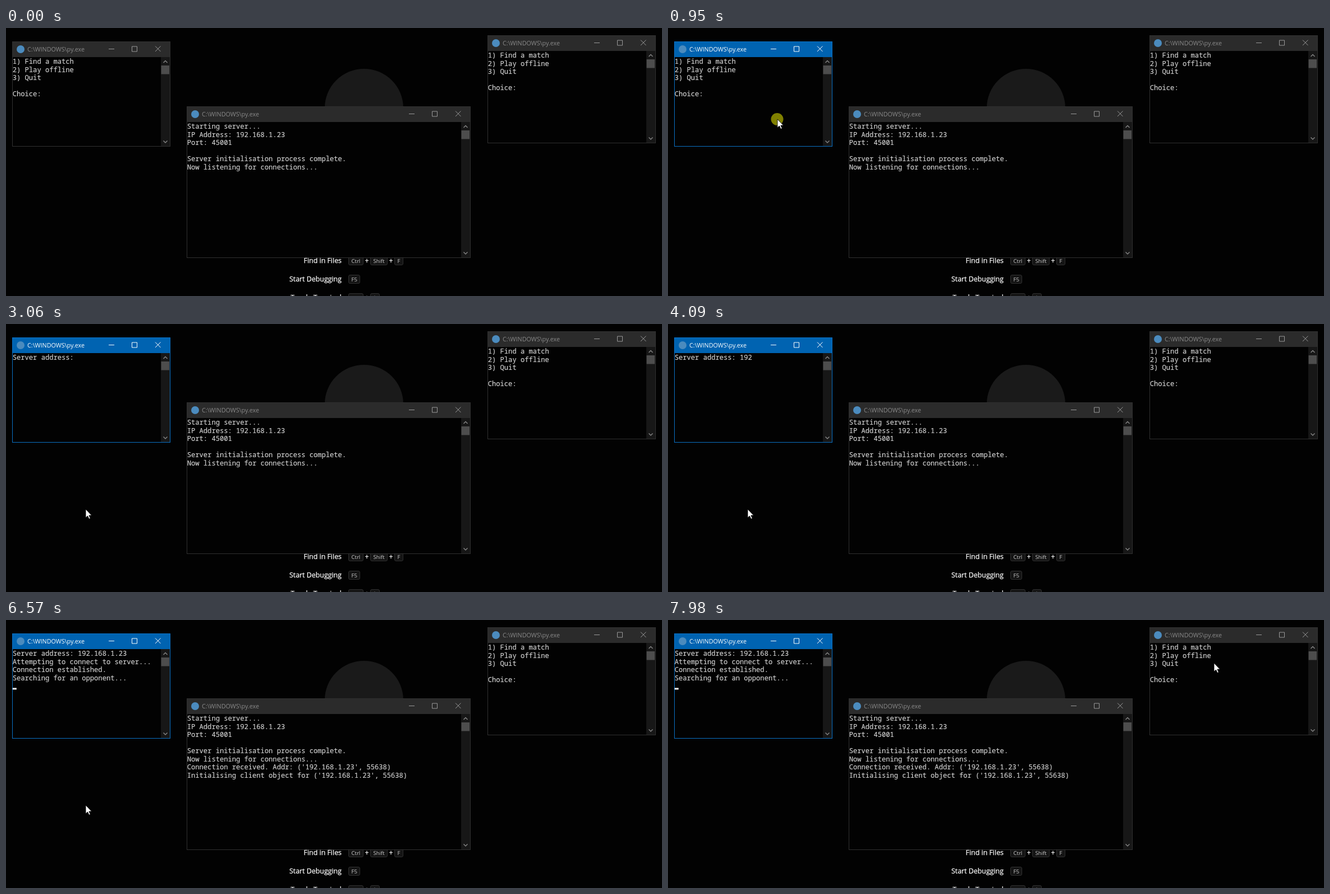
An HTML page for the animation above (8000 ms loop, 1169 px wide and 479 px high).

```html
<!DOCTYPE html>
<html lang="en">
<head>
<meta charset="utf-8">
<title>Game server and two clients</title>
<style>
  html, body { margin: 0; width: 100%; height: 100%; overflow: hidden; background: #020202; }
  svg { display: block; }
  text { white-space: pre; }
  .mono { font: 12.12px "Noto Sans Mono", monospace; fill: #d4d4d4; stroke: #d4d4d4; stroke-width: .15; }
  .title { font: 10.75px "Open Sans", sans-serif; fill: #8a8a8a; }
  .label { font: 12.4px "Open Sans", sans-serif; fill: #fff; stroke: #fff; stroke-width: .25; }
  .key { font: 9.6px "Open Sans", sans-serif; fill: #ccc; }
  .bar { fill: #2b2b2b; }
  .edge { fill: none; stroke: #303030; }
  .icons { fill: none; stroke: #999; }
  .active .bar { fill: #0063b1; }
  .active .edge { stroke: #0a70c4; }
  .active .title { fill: #fff; }
  .active .icons { stroke: #fff; }
</style>
</head>
<body>
<svg id="stage" width="1169" height="479" viewBox="0 0 1169 479"></svg>
<script>
const LOOP = 8000, TICK = 24, CELL_W = 7.27, CELL_H = 14.55;
const stage = document.getElementById('stage');
const clamp = (v, lo, hi) => Math.max(lo, Math.min(hi, v));

function add(parent, tag, attrs = {}, content) {
  const el = document.createElementNS('http://www.w3.org/2000/svg', tag);
  for (const name in attrs) el.setAttribute(name, attrs[name]);
  if (content !== undefined) el.textContent = content;
  parent.append(el);
  return el;
}

function setVisible(el, on) {
  el.setAttribute('visibility', on ? 'visible' : 'hidden');
}

function makeWindow(x, y, w, h) {
  const g = add(stage, 'g', { transform: `translate(${x} ${y})` });
  const bar = w - 17, mid = w - 9;
  add(g, 'rect', { width: w, height: h, fill: '#020202' });
  add(g, 'rect', { class: 'bar', width: w, height: 28 });
  add(g, 'rect', { x: bar, y: 28, width: 16, height: h - 29, fill: '#171717' });
  add(g, 'rect', { x: bar + .5, y: 43, width: 14.5, height: 15.5, fill: '#4d4d4d' });
  add(g, 'path', {
    d: `M${mid - 3.5} 38l3.5 -3.5l3.5 3.5M${mid - 3.5} ${h - 10.5}l3.5 3.5l3.5 -3.5`,
    fill: 'none', stroke: '#858585', 'stroke-width': 1.4
  });
  add(g, 'rect', { class: 'edge', x: .5, y: .5, width: w - 1, height: h - 1 });
  add(g, 'circle', { cx: 15, cy: 14, r: 7, fill: '#4b8bbe' });
  add(g, 'text', { class: 'title', x: 27, y: 18 }, 'C:\\WINDOWS\\py.exe');
  add(g, 'path', {
    class: 'icons',
    d: `M${w - 110} 13.5h10M${w - 68.5} 9h9v9h-9zM${w - 27} 8.5l9.5 9.5m0 -9.5l-9.5 9.5`
  });
  const rows = Array.from({ length: 8 }, (_, i) =>
    add(g, 'text', { class: 'mono', x: .8, y: 40 + i * CELL_H }, ''));
  return {
    g,
    show(lines) {
      rows.forEach((row, i) => {
        const line = lines[i] || '';
        if (row.textContent !== line) row.textContent = line;
      });
    }
  };
}

function makeShortcut(y, name, keys) {
  const label = (x, s, anchor) => add(stage, 'text', { class: 'label', x, y, 'text-anchor': anchor }, s);
  label(598, name, 'end');
  let x = 610;
  keys.forEach((key, i) => {
    if (i) label(x - 6, '+', 'middle');
    const box = add(stage, 'rect', { x: x + .5, y: y - 11.5, height: 15, rx: 2.5, fill: '#141414', stroke: '#303030' });
    const text = add(stage, 'text', { class: 'key', x: x + 5.5, y: y - .5 }, key);
    const w = Math.round(text.getComputedTextLength() + 11);
    box.setAttribute('width', w - 1);
    x += w + 12;
  });
}

// Editor behind the windows
add(stage, 'circle', { cx: 638, cy: 143, r: 70, fill: '#1a1a1a' });
makeShortcut(420, 'Find in Files', ['Ctrl', 'Shift', 'F']);
makeShortcut(453, 'Start Debugging', ['F5']);
makeShortcut(486, 'Toggle Terminal', ['Ctrl', '`']);

const left = makeWindow(11, 24, 282, 188);
const right = makeWindow(858, 13, 300, 193);
const server = makeWindow(322, 140, 506, 271);
const caret = add(left.g, 'rect', { width: 7, height: 3, fill: '#f2f2f2' });
const halo = add(stage, 'circle', { cx: 194.5, cy: 163, r: 11, fill: '#808000' });
const mouse = add(stage, 'path', {
  d: 'M0 0V15.2L3.5 12L6 17.4L8.3 16.4L5.9 11.1H10.6Z',
  fill: '#fff', stroke: '#000', 'stroke-width': .8
});

const menu = ['1) Find a match', '2) Play offline', '3) Quit', '', 'Choice: '];
const chosen = [...menu.slice(0, 4), 'Choice: 1'];
const prompt = 'Server address: ', address = '192.168.1.23';
const listening = ['Starting server...', 'IP Address: 192.168.1.23', 'Port: 45001', '',
  'Server initialisation process complete.', 'Now listening for connections...'];
const connected = [...listening, "Connection received. Addr: ('192.168.1.23', 55638)",
  "Initialising client object for ('192.168.1.23', 55638)"];

// The caret follows the end of the last line
const screens = [
  { at: 0, lines: menu },
  { at: 1860, lines: chosen },
  { at: 2010, lines: [...chosen, ''] },
  { at: 2080, lines: [''] },
  { at: 2160, lines: [prompt], typing: true },
  { at: 6570, lines: [prompt + address, 'Attempting to connect to server...',
    'Connection established.', 'Searching for an opponent...', ''] }
];

const glides = [
  { at: 390, end: 810, path: [[649, 440], [592, 318], [513, 257], [257, 193], [222, 175], [195, 163]] },
  { at: 1220, end: 1290, path: [[195, 164], [202, 177]] },
  { at: 1450, end: 1570, path: [[193, 195], [152, 272], [142, 331]] },
  { at: 7210, end: 7510, path: [[142, 331], [138, 297], [153, 275], [286, 248]] },
  { at: 7510, end: 7980, path: [[286, 248], [657, 171], [880, 110], [932, 88], [973, 77]] }
];

const current = (list, t) => list.findLast(item => item.at <= t);

// Catmull-Rom curve through evenly timed points
function along(path, u) {
  const last = path.length - 1;
  const i = Math.min(Math.floor(u * last), last - 1), f = u * last - i;
  const p = k => path[clamp(i + k, 0, last)];
  return [0, 1].map(axis => {
    const [a, b, c, d] = [-1, 0, 1, 2].map(k => p(k)[axis]);
    return b + f / 2 * (c - a + f * (2 * a - 5 * b + 4 * c - d + f * (3 * (b - c) + d - a)));
  });
}

// The address is typed in two runs, each at a steady pace
function typedCount(t) {
  const run = (start, pace, max) => clamp(1 + Math.floor((t - start) / pace), 0, max);
  return run(3640, 200, 7) + run(5740, 155, 5);
}

function draw() {
  const t = performance.now() % LOOP;
  const screen = current(screens, t);
  const lines = screen.typing ? [prompt + address.slice(0, typedCount(t))] : screen.lines;
  left.show(lines);
  server.show(t < 6570 ? listening : connected);
  left.g.setAttribute('class', t < 870 ? '' : 'active');

  // New output keeps the caret lit, otherwise it blinks
  const lit = t - screen.at < 640 || (t + 690) % 1060 < 530;
  caret.setAttribute('x', .8 + lines.at(-1).length * CELL_W);
  caret.setAttribute('y', 39.2 + (lines.length - 1) * CELL_H);
  setVisible(caret, t > 1020 && lit);
  setVisible(halo, t >= 840 && t < 1020);

  const glide = current(glides, t);
  setVisible(mouse, glide);
  if (glide) {
    const { at, end, path } = glide;
    const elapsed = t >= end ? end - at : Math.floor((t - at) / TICK) * TICK;
    mouse.setAttribute('transform', `translate(${along(path, elapsed / (end - at)).map(Math.round)})`);
  }
  requestAnimationFrame(draw);
}

right.show(menu);
draw();
</script>
</body>
</html>
```
